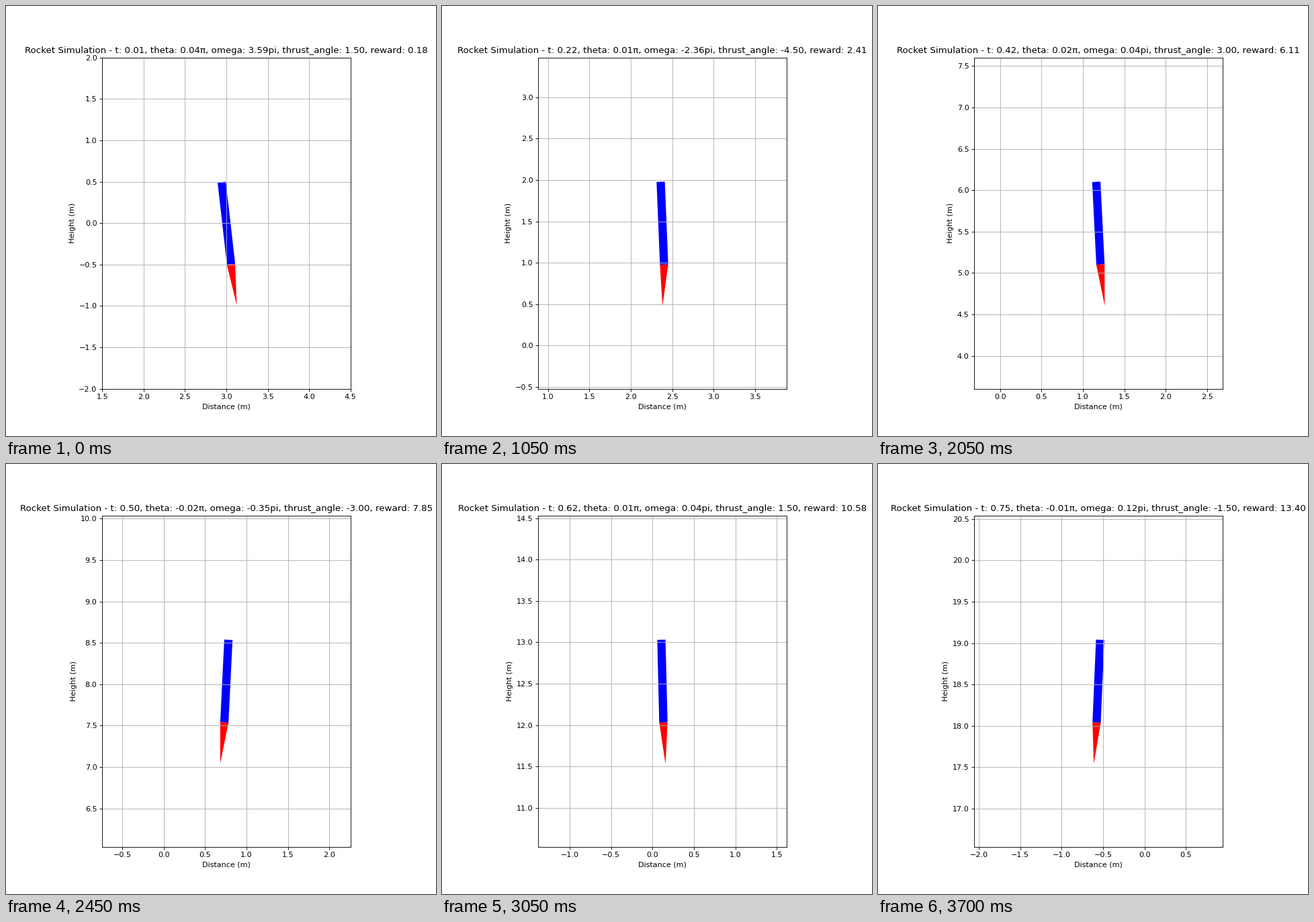
These frames come from a looping animation (640x640 px, 3.75 s). A matplotlib script:

```python
import numpy as np
import matplotlib.pyplot as plt
from matplotlib.animation import FuncAnimation
from matplotlib.patches import Polygon

STEPS = 75
DT = 0.01
THRUST, GRAVITY = 80.0, 9.81      # m/s^2
NOTCH = 1.5                       # gimbal resolution in degrees
BEND = -0.08 * DT / NOTCH         # turn per step^2 for one degree of gimbal
LENGTH, WIDTH, FLAME = 1.0, 0.1, 0.5

# Key poses: step, x, y, theta (pi), omega (pi/s), gimbal (degrees), reward
KEYS = np.array([
    (0, 3.0, 0.0, 0.0359, 3.59, 1.5, 0.18),
    (12, 2.838, 0.5145, 0.2153, -1.14, 9.0, 1.18),
    (29, 1.862, 2.7924, -0.069, 0.60, -4.5, 3.78),
    (41, 1.187, 5.602, 0.016, 0.04, 3.0, 6.11),
    (49, 0.756, 8.037, -0.0155, -0.35, -3.0, 7.85),
    (61, 0.1187, 12.5308, 0.0078, 0.04, 1.5, 10.58),
    (74, -0.557, 18.54, -0.0135, 0.12, -1.5, 13.40),
])
key_step, key_x, key_y, key_theta, key_omega, key_gimbal, key_reward = KEYS.T
steps = np.arange(STEPS)


def swing(a, b):
    """Quintic in the step number that joins two key poses."""
    span = b[0] - a[0]

    def state(key):
        bend = BEND * key[5]
        return key[3], (key[4] * DT - bend / 2) * span, bend * span ** 2

    (p0, v0, a0), (p1, v1, a1) = state(a), state(b)
    p, v, acc = p1 - p0 - v0 - a0 / 2, v1 - v0 - a0, a1 - a0
    coef = [p0, v0, a0 / 2, 10 * p - 4 * v + acc / 2,
            -15 * p + 7 * v - acc, 6 * p - 3 * v + acc / 2]
    return np.polynomial.Polynomial(coef, domain=[a[0], b[0]], window=[0, 1])


def attitude(step):
    """Theta, omega and gimbal at one step."""
    leg = min(np.searchsorted(key_step, step, side="right"), len(KEYS) - 1)
    curve = swing(KEYS[leg - 1], KEYS[leg])
    bend = curve.deriv(2)(step)
    omega = (curve.deriv()(step) + bend / 2) / DT
    gimbal = NOTCH * np.round(bend / BEND / NOTCH) + 0.0
    return curve(step), omega, gimbal


def drift(start, accel):
    """Position under an acceleration, starting at rest."""
    speed = np.cumsum(accel) * DT
    return start + np.cumsum(np.append(0, speed[:-1])) * DT


def settle(track, marks):
    """Ease a track onto its key values."""
    gap = marks - track[key_step.astype(int)]
    return track + np.interp(steps, key_step, gap)


thetas, omegas, gimbals = np.array([attitude(s) for s in steps]).T
push = np.append(0, thetas[:-1]) * np.pi - np.radians(gimbals)
xs = settle(drift(3.0, -THRUST * np.sin(push)), key_x)
ys = settle(drift(0.0, THRUST * np.cos(push) - GRAVITY), key_y)
rewards = settle(np.cumsum(0.235 / (1 + 9 * np.abs(thetas))), key_reward)

fig, ax = plt.subplots(figsize=(8, 8), dpi=80)
ax.set_aspect("equal")
ax.set_xlabel("Distance (m)")
ax.set_ylabel("Height (m)")
ax.grid(True)
body = ax.add_patch(Polygon(np.zeros((4, 2)), fc="blue"))
flame = ax.add_patch(Polygon(np.zeros((3, 2)), fc="red"))


def down(angle):
    return np.array([np.sin(angle), -np.cos(angle)])


def draw(i):
    center = np.array([xs[i], ys[i]])
    angle = thetas[i] * np.pi
    axis = down(angle) * LENGTH / 2
    side = np.array([np.cos(angle), np.sin(angle)]) * WIDTH / 2
    top, base = center - axis, center + axis
    tip = base + FLAME * down(angle + np.radians(gimbals[i]))
    body.set_xy([top - side, top + side, base + side, base - side])
    flame.set_xy([base - side, base + side, tip])
    ax.set_xlim(xs[i] - 1.5, xs[i] + 1.5)
    ax.set_ylim(ys[i] - 2, ys[i] + 2)
    ax.set_title(f"Rocket Simulation - t: {(i + 1) * DT:.2f}, "
                 f"theta: {thetas[i]:.2f}π, omega: {omegas[i]:.2f}pi, "
                 f"thrust_angle: {gimbals[i]:.2f}, reward: {rewards[i]:.2f}")
    return body, flame


anim = FuncAnimation(fig, draw, frames=STEPS, interval=50, repeat=True)
plt.show()
```
